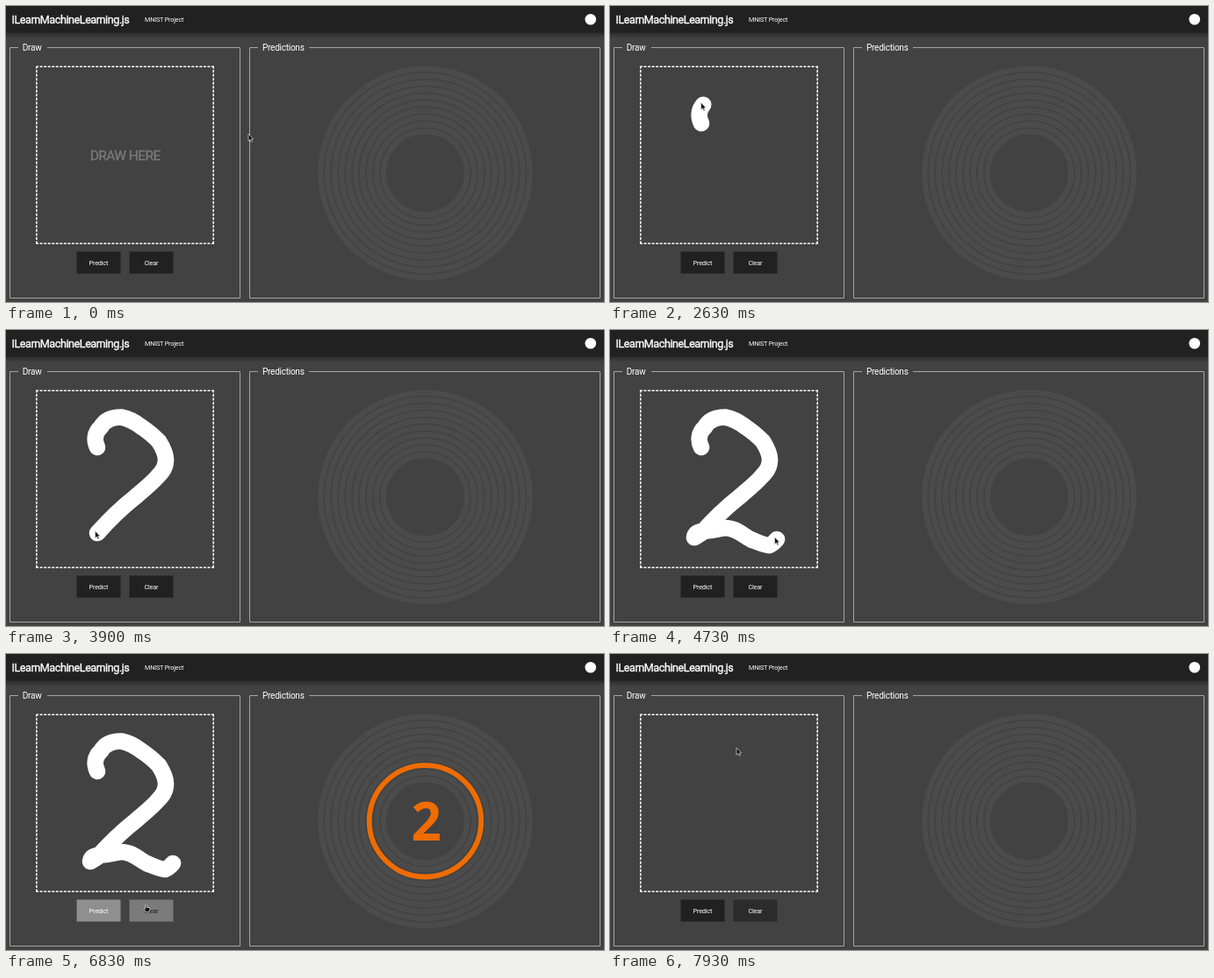
Recreate the animation shown at these times as an HTML page. Size 681 by 338 pixels, loop 8000 ms.

```html
<!DOCTYPE html>
<html lang="en">
<head>
<meta charset="utf-8">
<title>MNIST Project</title>
<style>
  html, body { margin: 0; width: 100%; height: 100%; overflow: hidden; background: #424242; }
  svg { display: block; width: 681px; height: 338px; }
  text { font: 7.3px Roboto, "Open Sans", sans-serif; letter-spacing: -.028em; fill: #fff; }
  .title { font-size: 12.6px; letter-spacing: -.035em; stroke: #fff; stroke-width: .35px; }
  .legend { font-size: 10px; letter-spacing: -.025em; }
  .hint { font-size: 15.5px; letter-spacing: -.036em; fill: #7b7b7b; stroke: #7b7b7b; stroke-width: .3px; }
  .digit { font: 700 60px "Open Sans", "Noto Sans", sans-serif; letter-spacing: 0; fill: #ef6c00; text-anchor: middle; }
  .frame { fill: none; stroke: #a4a4a4; }
  .dashes { stroke: #fff; stroke-width: 1.6; stroke-dasharray: 3 1.545; fill: none; }
  .ring { fill: none; stroke: #4b4b4b; stroke-width: 6.3; }
  #arc { stroke: #ef6c00; stroke-width: 5.8; }
  .leg { fill: none; }
  .ink { stroke: #fff; stroke-width: 18.6; stroke-linecap: round; stroke-linejoin: round; }
  .cursor { fill: #111; stroke: #ddd; stroke-width: .7; stroke-linejoin: round; }
</style>
</head>
<body>
<svg viewBox="0 0 681 338">
  <defs>
    <linearGradient id="shade" x2="0" y2="1">
      <stop stop-color="#000" stop-opacity=".35"/>
      <stop offset="1" stop-color="#000" stop-opacity="0"/>
    </linearGradient>
  </defs>
  <rect width="681" height="338" fill="#424242"/>
  <rect y="30" width="681" height="7" fill="url(#shade)"/>
  <rect width="681" height="30.5" fill="#212121"/>
  <text class="title" x="6.5" y="19.6">ILearnMachineLearning.js</text>
  <text x="158" y="18">MNIST Project</text>
  <circle cx="665.7" cy="15.2" r="6.3" fill="#fff"/>

  <path class="frame" d="M14 47.5H4.5V333.5H266.5V47.5H47"/>
  <path class="frame" d="M287 47.5H277.5V333.5H676.5V47.5H345"/>
  <text class="legend" x="18.7" y="51.4">Draw</text>
  <text class="legend" x="292" y="51.4">Predictions</text>

  <path class="dashes" d="M34 69.3H237M34 271.2H237M34.8 68.5V271.5M236.2 68.5V271.5"/>
  <text class="hint" id="hint" x="95.7" y="176">DRAW HERE</text>

  <!-- Pointer journey in order of time; the ink legs also leave a trace. -->
  <path class="leg" data-start="1100" data-end="1930" data-ease="smooth"
    d="M276 146C215 110 55 75 102 132"/>
  <path class="leg ink" data-start="2200" data-end="3000" data-ease="speedUp"
    d="M104 134C100 126 101 117 108 111C113 102 121 99.5 131 99.5C139 101 147 105 154 110.5"/>
  <path class="leg ink" data-start="3000" data-end="3870" data-ease="steady"
    d="M154 110.5C161 115 168 121 174 127C179 135 182 142 182 148C182 156 179 161 172 168C165 176 157 182 148 190C134 201 119 215 104 232"/>
  <path class="leg ink" data-start="3930" data-end="4700" data-ease="steady"
    d="M104 232L96 237Q97 231 104 230Q118 229 131 226C144 226 152 235 160 239C170 243 176 246 181 246Q186 244 190 239"/>
  <path class="leg" data-start="4740" data-end="5500" data-ease="smooth"
    d="M188 236.5C180 262 130 292 99.7 293"/>
  <path class="leg" data-start="6600" data-end="6830" data-ease="slowDown"
    d="M99.7 293Q135 300 159 286"/>
  <path class="leg" data-start="7400" data-end="7930" data-ease="speedUp"
    d="M159 286C150 288 102 230 144 107"/>

  <rect id="predict" x="80.5" y="280.5" width="50" height="25"/>
  <text id="predictLabel" x="94.6" y="296">Predict</text>
  <rect id="clear" x="140.5" y="280.5" width="50" height="25"/>
  <text id="clearLabel" x="157.4" y="296">Clear</text>

  <g id="rings"></g>
  <g id="result">
    <circle class="ring" id="arc" pathLength="1" transform="rotate(-90 477.4 190.8)"/>
    <text class="digit" x="478.5" y="213">2</text>
  </g>

  <g class="cursor" id="cursor">
    <path id="arrow" d="M0 0V8.2L1.9 6.5L3.2 9.4L4.5 8.8L3.3 6H5.7Z"/>
    <path id="hand" d="M-.4 .5Q.2 -.5 .9 .5V3.2L4.4 3.7Q5 4 4.9 5.5L4 8.6H.3L-2 5.2Q-2 4.2 -.4 5Z"/>
  </g>
</svg>
<script>
const LOOP = 8000;
const FADE = 300;
const ENTER_CANVAS = 1340;
const PREDICTED = 5840;
const CLEARED = 7370;
const predictHover = { from: 5170, to: 6680 };
const clearHover = { from: 6700, to: 7672 };

const easings = {
  steady: p => p,
  speedUp: p => p * p,
  slowDown: p => p * (2 - p),
  smooth: p => p * p * (3 - 2 * p)
};

const el = id => document.getElementById(id);
const clamp = v => Math.min(1, Math.max(0, v));
const within = (t, { from, to }) => t >= from && t < to;
const show = (node, on) => node.setAttribute("visibility", on ? "visible" : "hidden");

function setCircle(node, radius) {
  node.setAttribute("cx", 477.4);
  node.setAttribute("cy", 190.8);
  node.setAttribute("r", radius);
}

const ringRadius = digit => 47.6 + 7.95 * digit;
for (let digit = 0; digit < 10; digit++) {
  const ring = document.createElementNS("http://www.w3.org/2000/svg", "circle");
  ring.setAttribute("class", "ring");
  setCircle(ring, ringRadius(digit));
  el("rings").append(ring);
}
setCircle(el("arc"), ringRadius(2) + .2);

const legs = [...document.querySelectorAll(".leg")].map(path => ({
  path,
  start: +path.dataset.start,
  end: +path.dataset.end,
  ease: easings[path.dataset.ease],
  inked: path.classList.contains("ink"),
  length: path.getTotalLength()
}));

const travelled = (leg, t) =>
  leg.length * leg.ease(clamp((t - leg.start) / (leg.end - leg.start)));

function drawInk(t) {
  for (const leg of legs.filter(leg => leg.inked)) {
    show(leg.path, within(t, { from: leg.start, to: CLEARED }));
    leg.path.setAttribute("stroke-dasharray", `${travelled(leg, t)} ${2 * leg.length}`);
  }
}

function drawCursor(t) {
  const leg = legs.findLast(leg => t >= leg.start) || legs[0];
  const { x, y } = leg.path.getPointAtLength(travelled(leg, t));
  const offset = leg.inked ? 2.5 : 0;
  el("cursor").setAttribute("transform", `translate(${x - offset},${y - offset})`);
  const pointing = within(t, predictHover) || within(t, clearHover);
  show(el("hand"), pointing);
  show(el("arrow"), !pointing);
}

function drawButton(id, hover, t) {
  const fade = time => easings.smooth(clamp((t - time) / FADE));
  const shade = Math.round(33 + 222 * (fade(hover.from) - fade(hover.to)));
  el(id).setAttribute("fill", `rgb(${shade},${shade},${shade})`);
  el(id + "Label").style.fill = within(t, hover) ? "#212121" : "#fff";
}

function drawResult(t) {
  show(el("result"), within(t, { from: PREDICTED + 20, to: CLEARED }));
  const sweep = clamp((t - PREDICTED) / 270);
  el("arc").setAttribute("stroke-dasharray", sweep < 1 ? `${sweep} 2` : "none");
}

function tick() {
  const t = performance.now() % LOOP;
  show(el("hint"), t < ENTER_CANVAS);
  drawInk(t);
  drawButton("predict", predictHover, t);
  drawButton("clear", clearHover, t);
  drawResult(t);
  drawCursor(t);
  requestAnimationFrame(tick);
}
tick();
</script>
</body>
</html>
```
